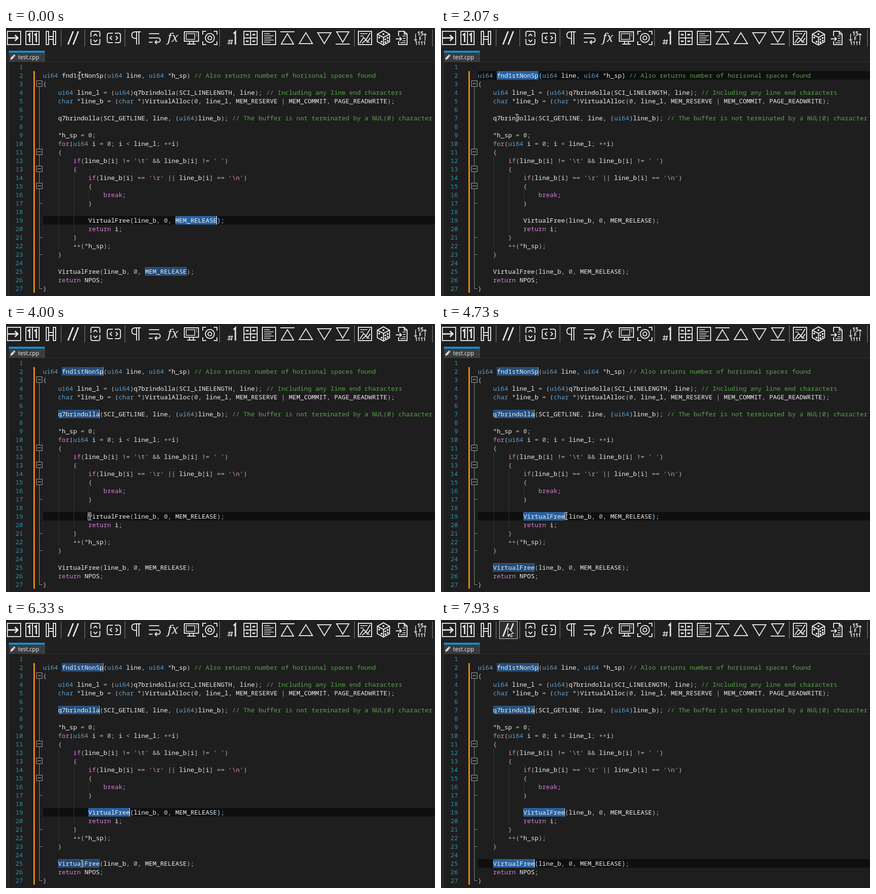
Write an HTML page that moves like this. It is 907 px wide and 566 px high and loops after 8000 ms.

```html
<!DOCTYPE html>
<html lang="en">
<head>
<meta charset="utf-8">
<title>Code editor</title>
<style>
html, body { margin: 0; width: 100%; height: 100%; overflow: hidden; background: #1e1e1e; }
svg { display: block; }
text { white-space: pre; }
.code { font: 13.3333px "Noto Sans Mono", "DejaVu Sans Mono", monospace; }
.type { fill: #5f9fcf; }
.key { fill: #d67fd8; }
.num { fill: #b5cea8; }
.str { fill: #d69d85; }
.note { fill: #57a64a; }
.op { fill: #b8b8b8; }
.id { fill: #f0f0f0; }
.no { fill: #2b91af; text-anchor: end; }
.brace { fill: #45a3e6; font-weight: bold; }
.icon { fill: none; stroke: #e6e6e6; stroke-width: 2; }
.icon text { fill: #e6e6e6; stroke: none; text-anchor: middle; }
.solid { fill: #e6e6e6; stroke: none; }
.thin { stroke-width: 1.5; }
.wide { stroke-width: 3; }
</style>
</head>
<body>
<svg id="stage" width="907" height="566" viewBox="0 0 907 566">
  <rect width="907" height="566" fill="#1e1e1e"/>
  <rect width="907" height="72" fill="#202020"/>
  <path d="M2.5 4V44M2.5 52V566" stroke="#484848" stroke-width="2" stroke-dasharray="1 3"/>
  <path d="M5.5 72V566M5 71.5H907" stroke="#343434"/>
  <rect x="6" y="48" width="76" height="24" fill="#3b3b3d"/>
  <rect x="6" y="48" width="76" height="4" fill="#0b93dc"/>
  <path d="M81.5 52V71" stroke="#555"/>
  <path d="M9 67L10 63L17 55.5L20 58.5L13 66Z" fill="#dcdcdc"/>
  <path d="M15 57.5L18 60.5" stroke="#3b3b3d"/>
  <text x="25.5" y="66" fill="#f0f0f0" font-size="12" font-family="'Open Sans', 'Noto Sans', sans-serif">test.cpp</text>
  <g id="hover"><rect x="123.5" y="2.5" width="38" height="37" fill="#303030" stroke="#d4d4d4"/></g>
  <g id="tools"></g>
  <g id="back"></g>
  <g id="doc"></g>
  <g id="front"></g>
  <g id="beam">
    <path d="M-4 -8H-1L0 -7L1 -8H4M0 -7V7M-4 8H-1L0 7L1 8H4" fill="none" stroke="#111" stroke-width="3"/>
    <path d="M-3.5 -7.5H-1L0 -6.5L1 -7.5H3.5M0 -7V7M-3.5 7.5H-1L0 6.5L1 7.5H3.5" fill="none" stroke="#f4f4f4" stroke-width="1.2"/>
  </g>
  <path id="arrow" d="M0 0V16.5L3.8 13L6.4 19L9 17.9L6.5 12H11.7Z" fill="#111" stroke="#fff" stroke-width="1.1"/>
</svg>
<script>
const $ = id => document.getElementById(id);
const X0 = 78, CW = 8, LH = 18;
const colX = col => X0 + col * CW;
const rowY = line => 73 + (line - 1) * LH;
const esc = s => s.replace(/&/g, '&amp;').replace(/</g, '&lt;');
const glyphs = (x, line, cls, s) =>
  `<text class="code ${cls}" x="${x}" y="${rowY(line) + 14}">${esc(s)}</text>`;

const lines = String.raw`
ui64 fnd1stNonSp(ui64 line, ui64 *h_sp) // Also returns number of horisonal spaces found
{
    ui64 line_l = (ui64)q7brindolla(SCI_LINELENGTH, line); // Including any line end characters
    char *line_b = (char *)VirtualAlloc(0, line_l, MEM_RESERVE | MEM_COMMIT, PAGE_READWRITE);

    q7brindolla(SCI_GETLINE, line, (ui64)line_b); // The buffer is not terminated by a NUL(0) character

    *h_sp = 0;
    for(ui64 i = 0; i < line_l; ++i)
    {
        if(line_b[i] != '\t' && line_b[i] != ' ')
        {
            if(line_b[i] == '\r' || line_b[i] == '\n')
            {
                break;
            }

            VirtualFree(line_b, 0, MEM_RELEASE);
            return i;
        }
        ++(*h_sp);
    }

    VirtualFree(line_b, 0, MEM_RELEASE);
    return NPOS;
}`.split('\n');

function tokenClass(s) {
  if (s.startsWith('//')) return 'note';
  if (s[0] === "'") return 'str';
  if (/^\d/.test(s)) return 'num';
  if (/^(ui64|char)$/.test(s)) return 'type';
  if (/^(for|if|break|return)$/.test(s)) return 'key';
  return /^\w/.test(s) ? 'id' : 'op';
}

function drawDoc() {
  let out = '<rect x="58" y="91" width="3" height="468" fill="#ee8a1c"/>';
  out += '<g fill="none" stroke="#8e8e8e"><path d="M70.5 118V550.5H77M70 370.5H77M70 442.5H77M70 478.5H77"/>';
  for (const line of [3, 11, 13, 15]) {
    const y = rowY(line) + 9;
    out += `<rect x="64.5" y="${y - 6.5}" width="12" height="12" fill="#1e1e1e" stroke="#a8a8a8"/>` +
      `<path d="M67 ${y - .5}H74" stroke="#d0d0d0"/>`;
  }
  out += '</g><g stroke="#666" stroke-dasharray="1 2">';
  for (const [col, from, to] of [[4, 12, 22], [8, 14, 20], [12, 16, 16]])
    out += `<path d="M${colX(col) + 1.5} ${rowY(from)}V${rowY(to + 1)}"/>`;
  out += '</g>';
  lines.forEach((row, i) => {
    out += glyphs(36, i + 1, 'no', String(i + 1));
    for (const m of row.matchAll(/\/\/.*|'[^']*'|\w+|[^\w\s'\/]+/g))
      out += glyphs(colX(m.index), i + 1, tokenClass(m[0]), m[0]);
  });
  $('doc').innerHTML = out;
}

const p = (d, cls = '') => `<path class="${cls}" d="${d}"/>`;
const label = (s, x, y, size, css = '') =>
  `<text x="${x}" y="${y}" style="font:${css} ${size}px 'Noto Sans', sans-serif">${s}</text>`;
const ring = r => `<circle r="${r}"/>`;
const dot = ([x, y]) => `<circle class="solid" cx="${x}" cy="${y}" r="2"/>`;

const icons = [
  [17, p('M-14 -14H14V14H-14Z') + p('M-14 0H8M2 -6L8 0L2 6', 'wide')],
  [56, p('M-14 -14H14V14H-14ZM0 -14V14') + p('M-10 -6L-6 -9V9M4 -6L8 -9V9', 'wide')],
  [95, p('M-10 -14H-5V14H-10ZM5 -14H10V14H5ZM-5 -3H5M-5 3H5')],
  [142, p('M-11 14L0 -14M0 14L11 -14', 'wide')],
  [189, p('M-9.5 -2V-10Q-9.5 -14 -6 -14H6Q9.5 -14 9.5 -10V-2M-9.5 2V10Q-9.5 14 -6 14H6Q9.5 14 9.5 10V2M-4 -4L0 -8L4 -4M-4 4L0 8L4 4')],
  [228, p('M-2 -10H-10Q-14 -10 -14 -6V6Q-14 10 -10 10H-2M2 -10H10Q14 -10 14 -6V6Q14 10 10 10H2M-4 -4L-8 0L-4 4M4 -4L8 0L4 4')],
  [275, p('M10 -13H-1Q-9 -13 -9 -6Q-9 1 -1 1H1M1 -13V14M6 -13V14')],
  [314, p('M-12 -9H10M-12 0H7Q12 0 12 4.5Q12 9 7 9H1M5 5L1 9L5 13M-12 9H-4')],
  [353, `<text y="8" style="font:italic 26px 'Noto Serif', serif">fx</text>`],
  [392, p('M-15 -13H15V7H-15ZM-4 7V12M4 7V12M-9 13H9') + p('M-11 -9H7V3H-11ZM10 -9H12M10 -5H12', 'thin')],
  [431, p('M-15 -7V-14H-8M8 -14H15V-7M15 7V14H8M-8 14H-15V7') + ring(9.5) + ring(4)],
  [478, p('M3 -9L7 -13V14', 'wide') + p('M-5 3L-7 14M0 3L-2 14M-9 6H2M-10 11H1', 'thin')],
  [517, p('M-14 -14H14V14H-14ZM0 -14V14M-14 0H14') + p('M-10 -7H-4M4 -7H10M-10 7H-4M4 7H10', 'wide')],
  [556, p('M-14 -14H14V14H-14Z') + p('M-10 -9H2M-10 -4.5H10M-10 0H5M-10 4.5H10M-10 9H3', 'thin')],
  [595, p('M-15 -13H15M0 -9L13 13H-13Z')],
  [634, p('M0 -11L14 12H-14Z')],
  [673, p('M0 12L14 -11H-14Z')],
  [712, p('M-15 13H15M0 9L13 -13H-13Z')],
  [759, p('M-14 -14H14V14H-14Z') + p('M-10 -9H5M-10 -4H-3M3 9H10', 'thin') + p('M-11 11L-3 -1L2 4L11 -11M-6 11L1 5L6 7L11 0')],
  [798, p('M0 -15L13 -8V8L0 15L-13 8V-8ZM-13 -8L0 -1L13 -8M0 -1V15') +
    [[0, -8], [-9, -1], [-4, 8], [4, 3], [9, 0], [4, 9], [9, 6]].map(dot).join('')],
  [837, p('M-7 -4V-14H5L11 -8V14H-7V7M5 -14V-8H11M-13 2H-1M-5 -2L-1 2L-5 6') + p('M1 -4H8M2 1H8M1 6H8M-3 10H8', 'thin')],
  [876, label('15', 0, -5, 12, 'bold') + label('F', 0, 5, 11, 'bold') + label('1111', 0, 15, 10, 'bold') +
    p('M-10 -9V6M-13 3L-10 6L-7 3M10 6V-9M7 -6L10 -9L13 -6', 'thin')]
];

function drawTools() {
  const bars = [116, 166, 251, 451, 736, 901].map(x => `M${x}.5 3V39`).join('');
  $('tools').innerHTML = `<path d="${bars}" stroke="#888"/>` +
    icons.map(([x, art]) => `<g class="icon" transform="translate(${x} 21)">${art}</g>`).join('');
}

// Pointer stops: time, x, y
const stops = [
  [0, 155, 100], [70, 155, 100], [330, 152, 100], [470, 152, 100], [860, 148, 100], [1070, 148, 100],
  [1600, 160, 189], [2330, 160, 189], [2530, 161, 193], [2800, 161, 193],
  [3470, 177, 405], [4000, 177, 406], [4350, 177, 406], [4730, 264, 405], [5210, 264, 405],
  [6070, 197, 510], [6330, 160, 514], [6940, 160, 514], [7800, 142, 18], [7930, 141, 16], [8000, 141, 16]
];

function pointer(t) {
  const i = Math.max(1, stops.findIndex(s => s[0] >= t));
  const [ta, xa, ya] = stops[i - 1], [tb, xb, yb] = stops[i];
  const u = (t - ta) / (tb - ta), e = u * u * (3 - 2 * u);
  return [xa + (xb - xa) * e, ya + (yb - ya) * e];
}

// Word spans: line, first column, end column
const name = [2, 5, 16], callA = [4, 24, 35], callB = [7, 4, 15];
const freeA = [19, 12, 23], freeB = [25, 4, 15], flagA = [19, 35, 46], flagB = [25, 27, 38];
const DRAG = 4390, DROP = 5000;

// Editor states; the last selection is the main one
const states = [
  { at: 0, blink: -240, sels: [flagA], hits: [flagA, flagB], braces: [23, 46] },
  { at: 460, sels: [[2, 9, 9]] },
  { at: 590, blink: 560, sels: [name], hits: [name], braces: [16, 38] },
  { at: 2325, sels: [name, [7, 6, 6]] },
  { at: 2460, sels: [name, callB], hits: [callA, callB], braces: [15, 47] },
  { at: 3725, sels: [name, callB, [19, 12, 12]] },
  { at: DRAG, blink: DROP, sels: [name, callB, freeA], hits: [freeA, freeB], braces: [23, 46] },
  { at: 6460, sels: [name, callB, freeA, [25, 10, 10]] },
  { at: 6660, blink: 6730, sels: [name, callB, freeA, freeB], hits: [freeA, freeB], braces: [15, 38] }
];

const dragging = t => t >= DRAG && t < DROP;

function editorAt(t, x) {
  const now = states.filter(s => s.at <= t).pop();
  let { sels, hits = [], braces = [], blink = now.at } = now;
  const end = Math.max(12, Math.round((x - X0) / CW));
  if (dragging(t) && end < freeA[2]) {
    sels = [name, callB, [19, 12, end]];
    hits = braces = [];
  }
  const lit = t < blink || Math.floor((t - blink) / 500) % 2 === 0;
  return { sels, hits, braces, lit };
}

const block = ([line, a, b], fill) =>
  `<rect x="${colX(a)}" y="${rowY(line)}" width="${(b - a) * CW}" height="${LH}" fill="${fill}"/>`;
const outline = ([line, a, b]) =>
  `<rect x="${colX(a) + .5}" y="${rowY(line) + .5}" width="${(b - a) * CW - 1}" height="${LH - 1}" fill="#244a76" stroke="#365f8c"/>`;
const inside = (x, y) => ([line, a, b]) =>
  x >= colX(a) && x < colX(b) && y >= rowY(line) && y < rowY(line + 1);

function render(t) {
  const [x, y] = pointer(t);
  const { sels, hits, braces, lit } = editorAt(t, x);
  const main = sels[sels.length - 1], line = main[0];

  $('back').innerHTML = `<rect x="${X0}" y="${rowY(line)}" width="829" height="${LH}" fill="#0f0f0f"/>` +
    hits.filter(h => !sels.includes(h)).map(outline).join('') +
    sels.map(s => block(s, hits.includes(s) || s === main ? '#2861a2' : '#264f7e')).join('');

  $('front').innerHTML = braces.map(c => glyphs(colX(c), line, 'brace', lines[line - 1][c])).join('') +
    (lit ? sels.map(s => `<rect x="${colX(s[2]) - 1}" y="${rowY(s[0])}" width="1" height="${LH}" fill="${s === main ? '#fff' : '#b0b8c0'}"/>`).join('') : '');

  const isArrow = y < 73 || (!dragging(t) && sels.some(inside(x, y)));
  const at = `translate(${Math.round(x) + .5} ${Math.round(y) + .5})`;
  for (const [id, on] of [['arrow', isArrow], ['beam', !isArrow]]) {
    $(id).setAttribute('transform', at);
    $(id).style.display = on ? '' : 'none';
  }
  $('hover').style.display = y < 41 ? '' : 'none';
}

drawTools();
drawDoc();

// The screen refreshes fifteen times a second
const TICK = 1000 / 15;
let shown = -1;
function loop() {
  const tick = Math.floor((performance.now() % 8000 + 5) / TICK) % 120;
  if (tick !== shown) render((shown = tick) * TICK);
  requestAnimationFrame(loop);
}
loop();
</script>
</body>
</html>
```
